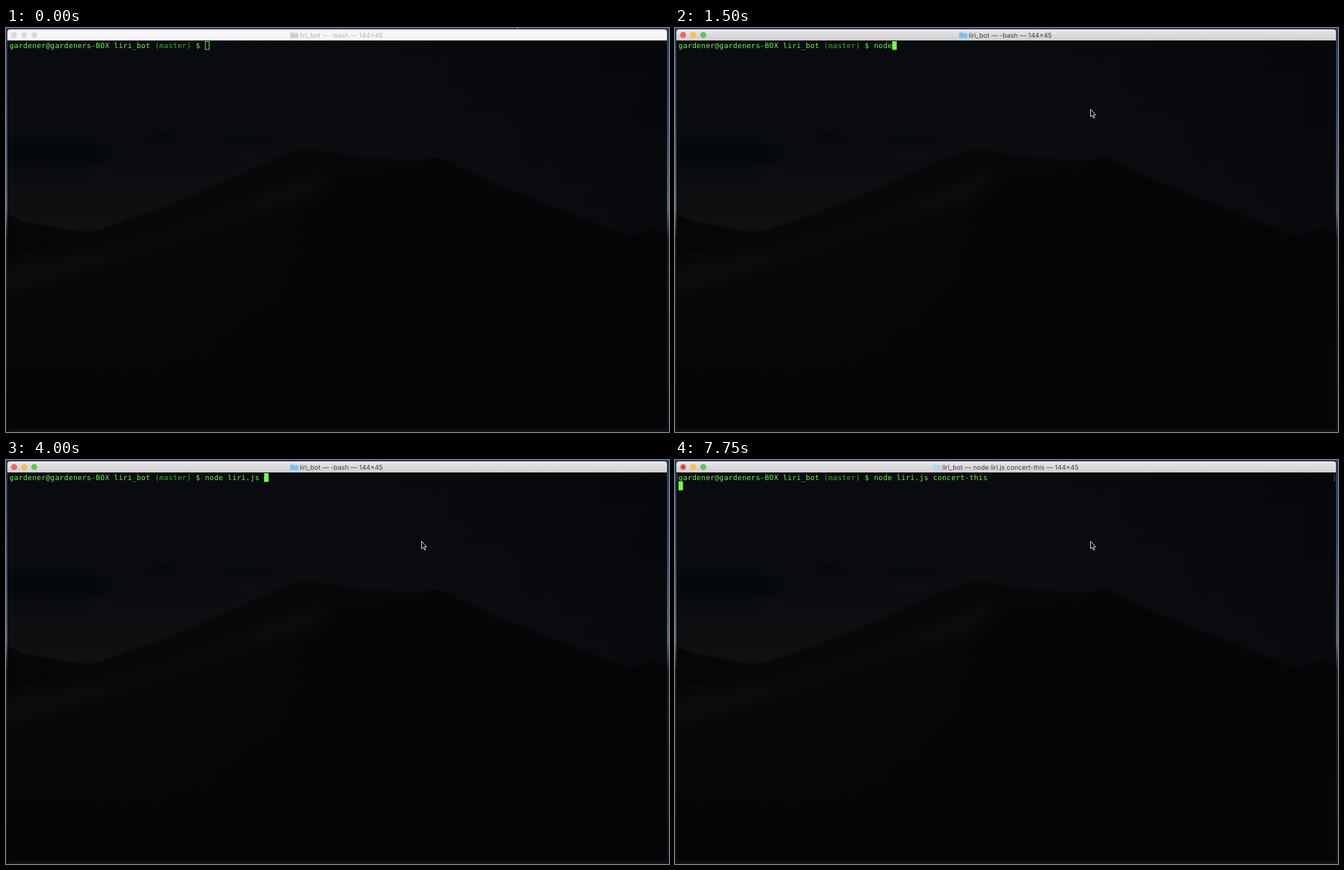
These frames come from a looping animation (958x584 px, 8 s). An HTML page:

```html
<!DOCTYPE html>
<html lang="en">
<head>
<meta charset="utf-8">
<title>Terminal session</title>
<style>
  html, body { margin: 0; width: 100%; height: 100%; overflow: hidden; background: #050506; }
  svg { display: block; width: 958px; height: 584px; }
  text { text-rendering: geometricPrecision; white-space: pre; }
  .mono { font: 10.3px "DejaVu Sans Mono", monospace; letter-spacing: .369px; fill: #76f552; }
  .dim { fill: #43b033; }
  #title { font: 9.5px Inter, sans-serif; text-anchor: middle; fill: #404040; }
  .blur1 { filter: blur(1px); }
  .blur6 { filter: blur(6px); }
  .blur12 { filter: blur(12px); }
  .idle #bar { fill: #f6f6f6; }
  .idle #title { fill: #b2b2b2; }
  .idle .light { fill: #dadada; }
  .idle #folder { fill: #cdcdcd; }
  .running #folder { fill: #b4d6e8; }
  #job { display: none; }
  .running #job { display: inline; }
  .idle #cursor { fill: none; stroke: #76f552; }
</style>
</head>
<body>
<svg viewBox="0 0 958 584">
  <defs>
    <linearGradient id="chrome" x2="0" y2="1">
      <stop stop-color="#e9e8e9"/><stop offset="1" stop-color="#cfcecf"/>
    </linearGradient>
    <linearGradient id="desk" x2="0" y2="1">
      <stop stop-color="#2c3a63"/><stop offset=".2" stop-color="#34476b"/>
      <stop offset=".45" stop-color="#5b6570"/><stop offset=".52" stop-color="#181c28"/>
      <stop offset="1" stop-color="#110e19"/>
    </linearGradient>
    <linearGradient id="sky" x2="0" y2="1">
      <stop stop-color="#090b0e"/><stop offset=".55" stop-color="#0b0d10"/>
      <stop offset="1" stop-color="#101112"/>
    </linearGradient>
    <linearGradient id="dusk">
      <stop offset=".45" stop-color="#05070b" stop-opacity="0"/>
      <stop offset="1" stop-color="#05070b" stop-opacity=".75"/>
    </linearGradient>
    <clipPath id="pane"><path d="M2 18H955V576q0 4-4 4H6q-4 0-4-4Z"/></clipPath>
    <clipPath id="dune">
      <path id="ridge" d="M0 330L125 295Q250 252 330 215T415 180Q432 173 460 179Q500 187 560 190H608Q620 185 632 191L700 224L780 255L860 287Q890 300 908 298L932 292L958 296V584H0Z"/>
    </clipPath>
  </defs>

  <rect width="958" height="584" fill="url(#desk)"/>
  <rect y="580" width="958" height="4" fill="#110e19"/>

  <g clip-path="url(#pane)">
    <rect y="18" width="958" height="300" fill="url(#sky)"/>
    <rect y="18" width="958" height="300" fill="url(#dusk)"/>
    <g class="blur6" fill="#06080b">
      <ellipse cx="65" cy="180" rx="100" ry="22" opacity=".75"/>
      <ellipse cx="45" cy="215" rx="70" ry="6" opacity=".7"/>
      <ellipse cx="225" cy="158" rx="26" ry="8"/>
      <ellipse cx="345" cy="160" rx="42" ry="7"/>
      <ellipse cx="180" cy="122" rx="35" ry="5" opacity=".5"/>
    </g>
    <path class="blur1" fill="#050606" d="M0 268L25 280L60 286L100 294L130 295L160 340H0Z"/>
    <use href="#ridge" class="blur1" fill="#070807"/>
    <g clip-path="url(#dune)">
      <path class="blur12" fill="#0c0f0b" d="M-20 352Q180 320 300 270T475 205L455 235Q330 275 230 310T-20 388Z"/>
      <path class="blur12" fill="#080a08" d="M-20 470Q200 430 390 385L330 420Q200 470 60 480Z"/>
      <path class="blur6" fill="#050506" d="M640 180L600 197Q545 212 485 211Q440 240 418 300Q416 375 385 390Q345 425 300 460Q245 490 175 499L-20 488V600H980V180Z"/>
    </g>
  </g>

  <path id="bar" fill="url(#chrome)" d="M2 18V6q0-4 4-4H951q4 0 4 4V18Z"/>
  <circle class="light" cx="11.7" cy="10.2" r="4.4" fill="#ec6a5f"/>
  <circle class="light" cx="26.3" cy="10.2" r="4.4" fill="#f4bf50"/>
  <circle class="light" cx="40.9" cy="10.2" r="4.4" fill="#62c455"/>
  <circle id="job" cx="11.7" cy="10.2" r="1.5" fill="#7c1712"/>
  <path id="folder" fill="#73c5ef" d="M0 7.2q0-.7.7-.7H4l1 1h6q.7 0 .7.7v5.6q0 .7-.7.7H.7q-.7 0-.7-.7Z"/>
  <text id="title" x="484.5" y="13.8"></text>

  <text class="mono" x="5" y="29.2">gardener@gardeners-BOX liri_bot <tspan class="dim">(master)</tspan> $ </text>
  <text class="mono" id="command" x="287.5" y="29.2"></text>
  <rect id="cursor" width="6.6" height="12.6" fill="#79fb53"/>
  <path id="marks" fill="none" stroke="#68706a" stroke-width=".7" d="M5 20.5H3.5V30.5H5M951.5 20.5H953V30.5H951.5"/>
  <path id="pointer" fill="#08090b" stroke="#f2f2f2" stroke-width=".9" d="M.5.5V11.3L3 9L4.8 13.2L6.5 12.4L4.8 8.5H7.8Z"/>
</svg>

<script>
  const LOOP = 8000, CELL = 6.57, LEFT = 5, PROMPT = 43;
  const $ = id => document.getElementById(id);
  const svg = document.querySelector("svg");

  // Start time, command line and, where it differs, the cursor state.
  const steps = [
    [0, "", "idle"],
    [500, "", "off"],
    [1000, ""],
    [1250, "n"],
    [1500, "node"],
    [1750, "node "],
    [2000, "node l"],
    [2250, "node lir"],
    [2500, "node liri."],
    [2750, "node liri.j"],
    [3000, "node liri"],
    [3250, "node liri."],
    [4000, "node liri.js "],
    [5500, "node liri.js ", "off"],
    [5750, "node liri.js co"],
    [6000, "node liri.js conc"],
    [6250, "node liri.js concer"],
    [6500, "node liri.js concert"],
    [6750, "node liri.js concert."],
    [7000, "node liri.js concert-"],
    [7250, "node liri.js concert-th"],
    [7500, "node liri.js concert-this"],
    [7750, "node liri.js concert-this", "running"]
  ];
  const pointerStops = [[0, 734, -12.7], [250, 608, 112], [500, 600, 117]];
  const at = (list, t) => list.findLast(item => item[0] <= t);
  let shown;

  function show(step) {
    const [, line, mode = "typing"] = step;
    const running = mode === "running", idle = mode === "idle";
    svg.setAttribute("class", mode);
    $("command").textContent = line;
    $("title").textContent = `liri_bot — ${running ? line : "-bash"} — 144×45`;
    $("folder").setAttribute("transform", `translate(${running ? 372.5 : 410.5} 0)`);
    $("marks").style.display = running ? "" : "none";

    const cursor = $("cursor"), inset = idle ? .5 : 0;
    cursor.style.display = mode === "off" ? "none" : "";
    cursor.setAttribute("x", LEFT + (running ? 0 : CELL * (PROMPT + line.length)) + inset);
    cursor.setAttribute("y", (running ? 31.2 : 19) + inset);
    cursor.setAttribute("width", idle ? 5.6 : 6.6);
    cursor.setAttribute("height", idle ? 11.5 : 12.6);
  }

  function draw() {
    const t = performance.now() % LOOP;
    const step = at(steps, t);
    if (step !== shown) show(shown = step);
    const [, x, y] = at(pointerStops, t);
    $("pointer").setAttribute("transform", `translate(${x} ${y})`);
    requestAnimationFrame(draw);
  }
  draw();
</script>
</body>
</html>
```
